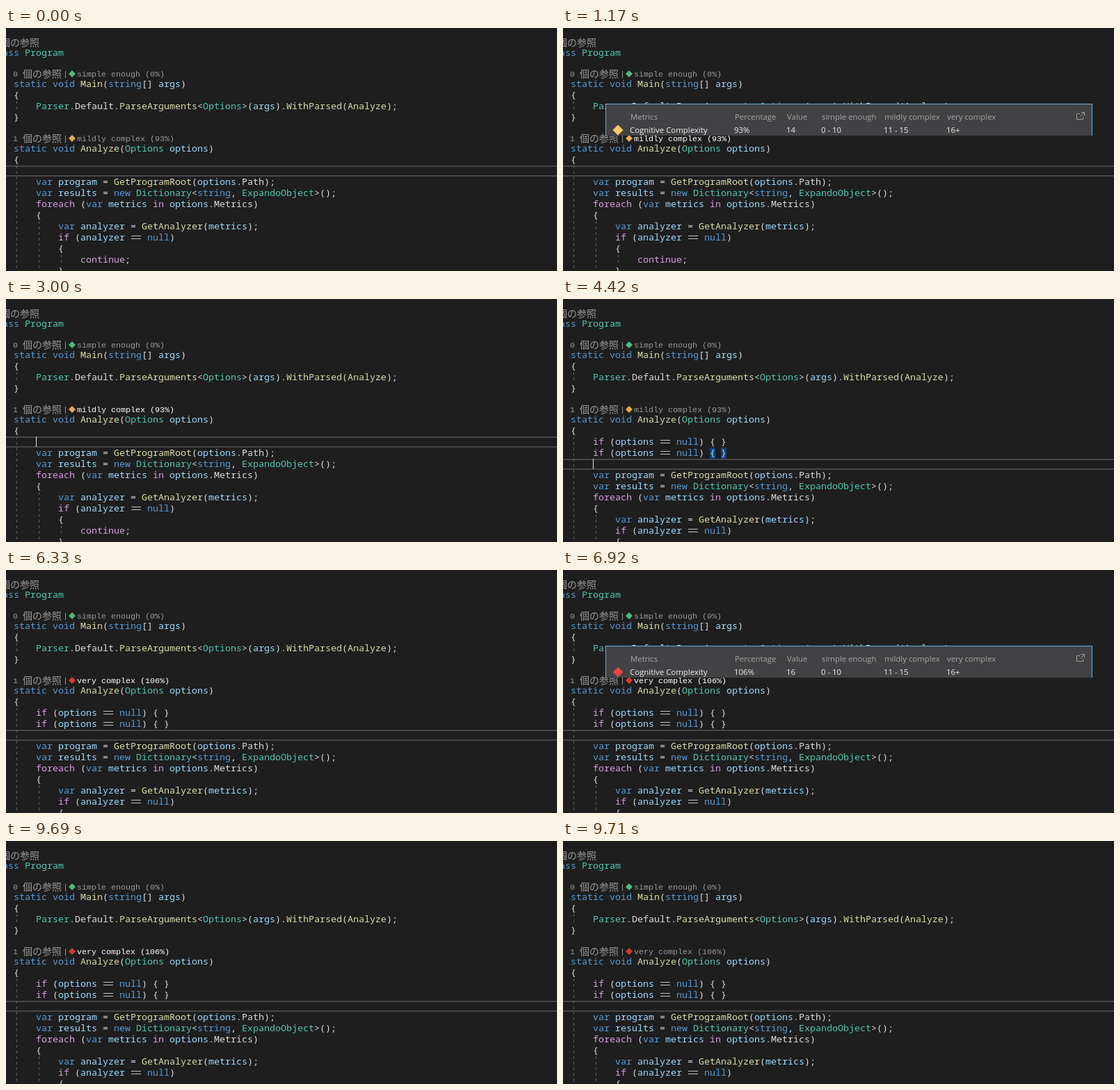
An HTML page that plays this animation: 792 by 350 pixels, repeating every 9.76 s.

```html
<!DOCTYPE html>
<html lang="en">
<head>
<meta charset="utf-8">
<title>Code metrics</title>
<style>
html, body { margin: 0; width: 100%; height: 100%; overflow: hidden; background: #1e1e1e; }
svg { display: block; }
text { white-space: pre; }
.code { font: 13.3333px "Noto Sans Mono", "DejaVu Sans Mono", monospace; fill: #dcdcdc; }
.key { fill: #569cd6; }
.flow { fill: #d8a0df; }
.type { fill: #4ec9b0; }
.func { fill: #dcdcaa; }
.var { fill: #9cdcfe; }
.gap { fill: transparent; }
.eq { stroke: #c4c4c4; fill: none; }
.lens { font: 11.6667px "Liberation Mono", monospace; fill: #999; }
.lens .cjk { font: 14px "Noto Sans CJK JP", "Noto Sans CJK", sans-serif; font-weight: 300; }
.lens .hot { fill: #fff; }
.guide { stroke: #5e5e5e; stroke-dasharray: 4 4; }
.box { fill: #424245; stroke: #6caddf; }
.tip { font: 11.4px "Open Sans", "Noto Sans", sans-serif; fill: #f1f1f1; }
.tip .head { fill: #a6a6a6; }
.icon { fill: none; stroke: #a0a0a0; }
</style>
</head>
<body>
<svg id="stage" width="792" height="350" viewBox="0 0 792 350">
  <g id="frame" fill="#464646">
    <rect y="198" width="792" height="2"/>
    <rect y="212" width="792" height="2"/>
  </g>
  <path class="guide" d="M15.5 105V121M15.5 198V350"/>
  <g id="braces" fill="#0e4583">
    <rect x="211" y="198" width="8" height="16"/>
    <rect x="227" y="198" width="8" height="16"/>
  </g>
  <g id="top" class="code"></g>
  <g id="pasted" class="code"></g>
  <g id="body" class="code">
    <path class="guide" d="M47.5 278V350M79.5 326V342"/>
  </g>
  <rect id="caret" width="1" height="15" fill="#e6e6e6"/>
  <g id="lenses" class="lens"></g>
  <svg width="792" height="155"><g id="popup" class="tip"></g></svg>
</svg>
<script>
const LOOP = 9760, COL = 8, ROW = 16, LEFT = 11, BLANK = 198, TIP_H = 128;
const RED = '#e2483d', GREEN = '#62d394', YELLOW = '#f9cb5f';
const $ = id => document.getElementById(id);

const words = {
  key: 'class static void string var new null',
  flow: 'foreach in if continue',
  type: 'Program Options Parser Dictionary ExpandoObject',
  func: 'Main ParseArguments WithParsed Analyze GetProgramRoot GetAnalyzer',
  var: 'args options program results metrics analyzer'
};
const kind = { '==': 'gap' };
for (const k in words) words[k].split(' ').forEach(w => kind[w] = k);

const esc = s => s.replace(/</g, '&lt;').replace(/>/g, '&gt;');

// One highlighted line; "==" is drawn as a joined pair of bars.
function line(indent, top, src) {
  const x = LEFT + indent * 4 * COL, y = top + 12;
  const spans = src.match(/[A-Za-z]+|==|[^A-Za-z=]+|=/g)
    .map(s => kind[s] ? `<tspan class="${kind[s]}">${s}</tspan>` : esc(s)).join('');
  const at = src.indexOf('==');
  const ex = x + at * COL + 1;
  const bars = at < 0 ? '' : `<path class="eq" d="M${ex} ${y - 6.5}h14m-14 4h14"/>`;
  return `<text x="${x}" y="${y}">${spans}</text>${bars}`;
}

const block = (top, rows) => rows.map(([n, s], i) => line(n, top + i * ROW, s)).join('');
const diamond = (x, y, r, fill) =>
  `<path fill="${fill}" d="M${x} ${y - r}l${r} ${r}l${-r} ${r}l${-r} ${-r}z"/>`;

$('top').innerHTML =
  line(-1, 28, 'class Program') +
  block(73, [
    [0, 'static void Main(string[] args)'],
    [0, '{'],
    [1, 'Parser.Default.ParseArguments<Options>(args).WithParsed(Analyze);'],
    [0, '}']
  ]) +
  block(166, [[0, 'static void Analyze(Options options)'], [0, '{']]);

$('body').innerHTML += block(214, [
  [1, 'var program = GetProgramRoot(options.Path);'],
  [1, 'var results = new Dictionary<string, ExpandoObject>();'],
  [1, 'foreach (var metrics in options.Metrics)'],
  [1, '{'],
  [2, 'var analyzer = GetAnalyzer(metrics);'],
  [2, 'if (analyzer == null)'],
  [2, '{'],
  [3, 'continue;'],
  [2, '}']
]);

$('pasted').innerHTML = [0, 1].map(i =>
  `<g>${line(1, BLANK + i * ROW, 'if (options == null) { }')}</g>`).join('');
const pasted = [...$('pasted').children];

const lens = (y, count, color, label, hot) =>
  `<text x="10" y="${y}">${count}</text><text class="cjk" x="24" y="${y + 1}">個の参照</text>` +
  `<text x="82" y="${y}">|</text>${diamond(95, y - 4, 5, color)}` +
  `<text x="102" y="${y}" class="${hot ? 'hot' : ''}">${label}</text>`;

const reports = [
  { label: 'mildly complex (93%)', color: '#dfae4c', tip: 163,
    rows: [['93%', 14, YELLOW], ['15%', 4, GREEN], ['58%', 47, GREEN], ['123%', 37, RED]] },
  { label: 'very complex (106%)', color: '#d23c33', tip: 159.5,
    rows: [['106%', 16, RED], ['26%', 6, GREEN], ['60%', 46, GREEN], ['130%', 39, RED]] }
];
const metrics = [
  ['Cognitive Complexity', '0 - 10', '11 - 15', '16+'],
  ['Cyclomatic Complexity', '1 - 10', '11 - 20', '21+'],
  ['Maintainability Index', '100 - 20', '19 - 10', '9 - 0'],
  ['Lines of Code', '0 - 20', '21 - 30', '31+']
];
const cols = [96, 246, 321, 371, 461, 551];
const cells = (vals, y, dx, cls) =>
  vals.map((v, i) => `<text class="${cls}" x="${cols[i] + dx}" y="${y}">${v}</text>`).join('');

function popup({ tip, rows }) {
  const head = ['Metrics', 'Percentage', 'Value', 'simple enough', 'mildly complex', 'very complex'];
  return `<path class="box" d="M61.5 27.5H760.5V140.5H${tip + 11}L${tip} 152.5L${tip - 11} 140.5H61.5Z"/>` +
    '<path class="icon" d="M743 41.5H738.5V49.5H747.5V46M743.5 45.5L749 40M745 39.5H749.5V44"/>' +
    cells(head, 50, 1, 'head') +
    rows.map(([pct, val, color], i) => {
      const [name, ...limits] = metrics[i], y = 69 + i * 19;
      return diamond(79, y - 4, 7.5, color) + cells([name, pct, val, ...limits], y, 0, '');
    }).join('');
}

// Timelines: pairs of start time and value, held until the next one.
const hover = [[0, 0], [710, 1], [3020, 0], [6330, 1], [9710, 0]];
const report = [[0, 0], [5050, 1]];
const filled = [[0, 0], [3740, 1], [3990, 2]];
const caretRow = [[0, 0], [3860, 1], [4420, 2]];
const braceRow = [[0, -1], [3800, 0], [3920, -1], [4110, 1], [4590, -1]];
const caretOn = [[0, 0], [940, 1], [1080, 0], [3000, 1], [3520, 0], [3740, 1],
  [4960, 0], [5440, 1], [5980, 0], [6500, 1], [6830, 0]];
const slide = from => [0, 40, 90, 150, 200, 250].map(d => [from + d, Math.round(TIP_H * d / 250)]);
const shown = [[0, 0], ...slide(1080), [3000, 0], ...slide(6830), [9690, 0]];

const at = (track, t) => track.reduce((v, [from, next]) => t >= from ? next : v, 0);
const set = (el, name, v) => el.setAttribute(name, v);
const show = (el, on) => set(el, 'visibility', on ? 'visible' : 'hidden');
const move = (el, y) => set(el, 'transform', `translate(0 ${y})`);

let lastReport, lastHover;
function draw(t) {
  const r = at(report, t), h = at(hover, t);
  if (r !== lastReport) $('popup').innerHTML = popup(reports[r]);
  if (r !== lastReport || h !== lastHover) {
    $('lenses').innerHTML = '<text class="cjk" x="-8" y="26">個の参照</text>' +
      lens(70, 0, '#4fba7f', 'simple enough (0%)', false) +
      lens(163, 1, reports[r].color, reports[r].label, h);
  }
  lastReport = r;
  lastHover = h;

  const row = at(caretRow, t), n = at(filled, t), brace = at(braceRow, t), height = at(shown, t);
  pasted.forEach((g, i) => show(g, i < n));
  move($('body'), row * ROW);
  move($('frame'), row * ROW);
  move($('braces'), brace * ROW);
  show($('braces'), brace >= 0);
  set($('caret'), 'x', LEFT + 4 * COL + (row < n ? 24 * COL : 0));
  set($('caret'), 'y', BLANK + row * ROW);
  show($('caret'), at(caretOn, t));
  move($('popup'), TIP_H - height);
  show($('popup'), height > 0);
}

function tick() {
  draw(performance.now() % LOOP);
  requestAnimationFrame(tick);
}
tick();
</script>
</body>
</html>
```
